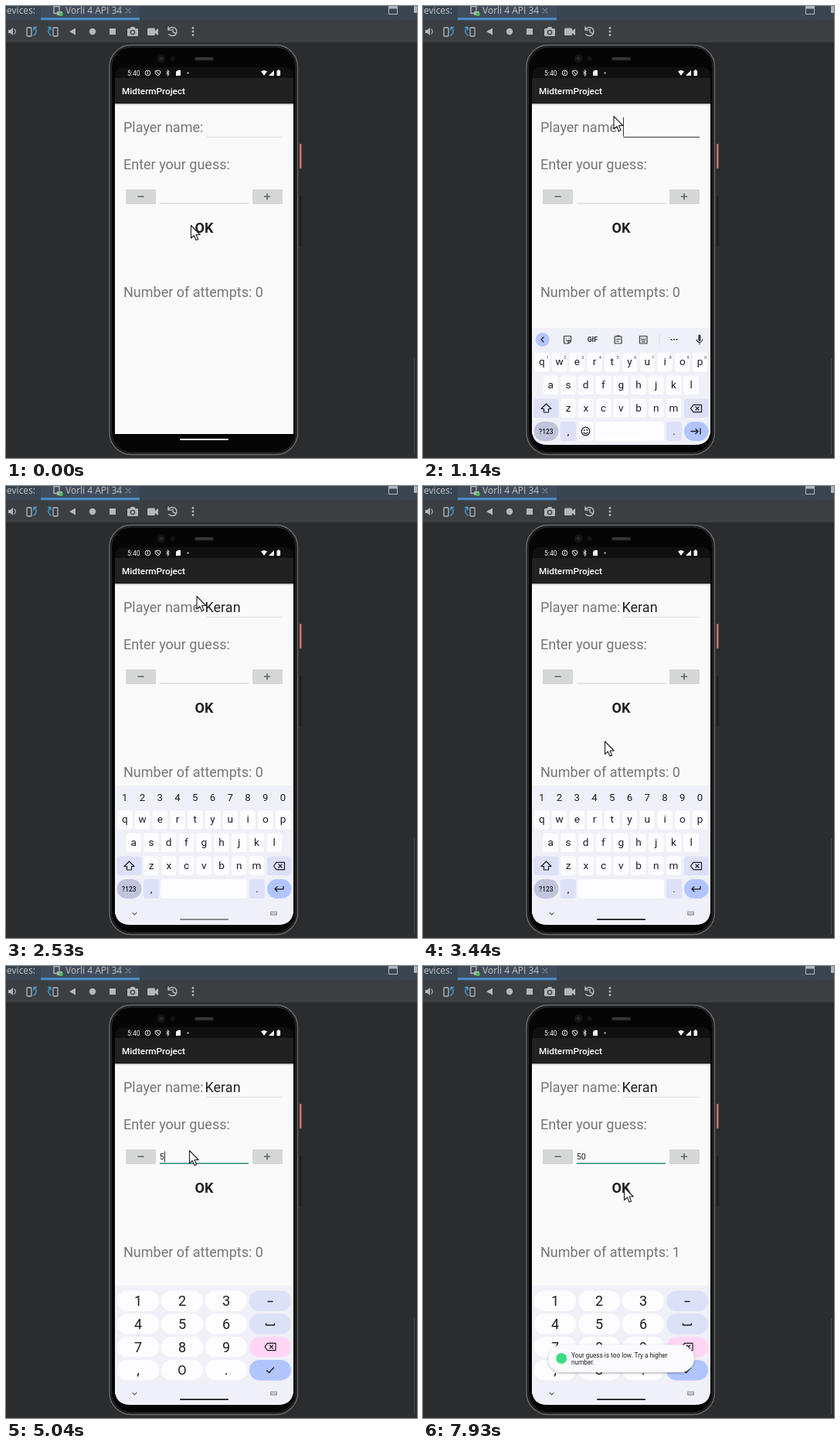
Write an HTML page that moves like this. It is 532 px wide and 584 px high and loops after 8 s.

```html
<!DOCTYPE html>
<html lang="en">
<head>
<meta charset="utf-8">
<title>Guessing game on a phone emulator</title>
<style>
  html, body { margin: 0; width: 100%; height: 100%; overflow: hidden; background: #2b2c2e; }
  svg { display: block; }
  text { font-family: Roboto, "Noto Sans", sans-serif; white-space: pre; }
  .ide { font-family: "Open Sans", "Noto Sans", sans-serif; }
  .ln { fill: none; stroke-linecap: round; stroke-linejoin: round; }
</style>
</head>
<body>
<svg id="stage" width="532" height="584" viewBox="0 0 532 584"></svg>
<script>
const LOOP = 8000;
const INK = '#1d1d22', KEY = '#fdfcff', SOFT = '#dde1f8', BLUE = '#b1c5ff', BOARD = '#f0f0f8';

// Markup helpers
const rect = (x, y, w, h, fill, r = 0, extra = '') =>
  `<rect x="${x}" y="${y}" width="${w}" height="${h}" rx="${r}" fill="${fill}" ${extra}/>`;
const text = (x, y, s, size, fill, extra = '') =>
  `<text x="${x}" y="${y}" font-size="${size}" fill="${fill}" ${extra}>${s}</text>`;
const mid = (x, y, s, size, fill = INK, extra = '') =>
  text(x, y, s, size, fill, 'text-anchor="middle" ' + extra);
const line = (d, color, w = 1.2) => `<path class="ln" d="${d}" stroke="${color}" stroke-width="${w}"/>`;
const fill = (d, color) => `<path d="${d}" fill="${color}"/>`;
const dot = (x, y, r, color, extra = '') => `<circle cx="${x}" cy="${y}" r="${r}" fill="${color}" ${extra}/>`;
const group = (id, body, extra = '') => `<g id="${id}" ${extra}>${body}</g>`;

function ide() {
  const c = '#b4b7ba', b = '#3f9fd0';
  return rect(0, 0, 532, 584, '#2b2c2e') +
    rect(0, 0, 532, 19, '#3a4552') + rect(45, 0, 128, 15, '#3f4c5b') +
    rect(45, 15, 128, 3.5, '#4a88c7') + rect(0, 18.5, 532, 28.5, '#3c3f41') +
    text(38, 10, 'Running Devices:', 12, '#c3c6c9', 'class="ide" text-anchor="end"') +
    text(77, 10, 'Vorli 4 API 34', 12, '#c3c6c9', 'class="ide"') +
    line('M62 0V9.5H66M69 6V0M62 .5H69', c, 1.4) + rect(66, 7, 7, 5, c, 1) + dot(71, 10.5, 2.6, '#49c153') +
    line('M155 3L161 9M161 3L155 9', '#7d848b', 1.1) +
    rect(495.5, 1, 11, 9.5, 'none', 0, `stroke="${c}"`) + rect(495, 0, 12, 3.5, c) +
    rect(528, 0, 4, 9, c, 1) +
    // toolbar
    fill('M3 31H5.500L9 28V38L5.500 35H3Z', c) + line('M11 30Q13.500 33 11 36', c) +
    rect(27, 28, 6, 11, 'none', 1, `stroke="${c}" stroke-width="1.3"`) +
    line('M36 38Q42 33 37 28M36 31V27.500H39.500', b, 1.5) +
    rect(61, 28, 6, 11, 'none', 1, `stroke="${c}" stroke-width="1.3"`) +
    line('M58 38Q52 33 57 28M54.500 27.500H58V31', b, 1.5) +
    fill('M82 33L90 28.500V37.500Z', c) + dot(112, 33, 4.2, c) + rect(134, 29, 8, 8, c) +
    rect(157, 29, 14, 10, c, 1.5) + rect(161, 27, 6, 4, c, 1) + dot(164, 34, 3.3, '#3c3f41') + dot(164, 34, 1.9, c) +
    rect(183, 28.5, 10, 9.5, c, 1.5) + fill('M193 32L197 29V38L193 35Z', c) +
    line('M211 29.500A5.600 5.600 0 1 1 211 36.500M210 27V31H214M216 30V33.500L219 35', c, 1.5) +
    [28.5, 33, 37.5].map(y => dot(242, y, 1.4, c)).join('') +
    rect(528, 455, 1, 129, '#4a4b4d') + rect(0, 579, 532, 5, '#2f2e2e');
}

function body() {
  const w = '#f4f4f4';
  return rect(380, 178, 2.5, 32, '#c9776c', 1) + rect(380, 245, 2.5, 66, '#1d1e1f', 1) +
    rect(134, 50.5, 243.5, 529, '#161617', 28, 'stroke="#6a6b6d" stroke-width="1.4"') +
    rect(136.5, 53, 238.5, 524, '#050505', 26, 'stroke="#2c2d2e" stroke-width="1"') +
    rect(244, 66, 25, 4.5, '#2c2c2e', 2) + rect(247, 67.6, 19, 1.2, '#444446') +
    dot(201, 68, 5.5, '#141416') + dot(201, 68, 2.4, '#26282c') + rect(213, 65, 5, 6, '#121214', 1) +
    fill('M141 94V91Q141 79 153 79H360Q372 79 372 91V94Z', '#101010') +
    rect(141, 93, 231, 33.5, '#212121') + rect(141, 126.5, 231, 426.5, '#fafafa') +
    rect(141, 126.5, 231, 1, '#d2d2d2') + rect(141, 127.5, 231, 1, '#ececec') +
    // status bar
    text(157, 89.7, '5:40', 8.6, w) +
    dot(183.5, 86.5, 3.3, 'none', `stroke="${w}"`) + rect(183, 85.7, 1, 2.6, w) + rect(183, 84.2, 1, 1, w) +
    line('M193.500 84L196.500 83L199.500 84V87Q199 89 196.500 90Q194 89 193.500 87ZM195 84.500L198 88.500', w, 1) +
    line('M209.500 83V90M207.500 85L211.500 88L209.500 90M207.500 88L211.500 85L209.500 83', w, .8) +
    fill('M220 85L222 83H226V90H220Z', w) + dot(235.5, 86.5, 1, w) +
    fill('M330 84.500Q334 81.500 338 84.500L334 90Z', w) + fill('M340 90L347 83V90Z', w) +
    rect(350.5, 83.2, 4.6, 7, w, .8) + rect(352, 82.3, 1.6, 1.5, w) +
    text(150, 114, 'MidtermProject', 11.75, '#fff', 'font-weight="500"');
}

function app() {
  const g = '#757575';
  const step = (x, d) => rect(x, 237, 39, 19, '#d6d7d7', 1) + line(d, '#626262', 1.6);
  return text(152, 163, 'Player name:', 18, g) + text(152, 211, 'Enter your guess:', 18, g) +
    text(152, 376, 'Number of attempts: <tspan id="tries">0</tspan>', 18, g) +
    mid(256.5, 293, 'OK', 18, '#212121', 'font-weight="700"') +
    step(155, 'M171 246.300H178') + step(319, 'M334.500 246.300H341.500M338 242.800V249.800') +
    '<rect id="nameLine" x="259" width="99"/><rect id="numLine" x="199" width="115"/>' +
    text(257.5, 163, '', 18, '#212121', 'id="name"') + text(198.7, 250, '', 10.6, '#212121', 'id="num"') +
    '<rect id="caret" width="1" fill="#333"/>';
}

const backspace = (x, y) =>
  line(`M${x - 7} ${y}L${x - 3.5} ${y - 4.7}H${x + 7}V${y + 4.7}H${x - 3.5}ZM${x - .5} ${y - 2}L${x + 3.5} ${y + 2}M${x + 3.5} ${y - 2}L${x - .5} ${y + 2}`, INK);

const footer = line('M164 551.500L166.500 554L169 551.500', '#66666c', 1.1) +
  rect(342, 549.5, 9, 5.5, '#a4a4ac', 1) + line('M343.500 551.300H349.500M344.500 553.200H348.500', BOARD, .8);

function letters() {
  let s = '';
  ['qwertyuiop', 'asdfghjkl', 'zxcvbnm'].forEach((row, r) => [...row].forEach((ch, i) => {
    const x = [153.8, 165.2, 188][r] + i * 22.75, y = 431 + r * 29.6;
    s += rect(x - 9.8, y - 12, 19.6, 24.5, KEY, 3.5) + mid(x, y + 4.3, ch, 13.6);
  }));
  return s + rect(143.5, 478.500, 32, 24.5, SOFT, 3.5) + rect(338, 478.500, 31.5, 24.5, SOFT, 3.5) +
    line('M159.500 485L166 491.500H162.500V496H156.500V491.500H153Z', INK) + backspace(353.5, 491) +
    rect(143.5, 508, 32, 25, '#c0c5dc', 12.5) + mid(159.3, 523.7, '?123', 8.4, INK, 'font-weight="500"') +
    rect(178, 508, 20, 25, SOFT, 3.5) + mid(188, 524.5, ',', 13) +
    rect(315, 508, 20, 25, SOFT, 3.5) + mid(325, 524.5, '.', 13) +
    rect(338, 508, 31.5, 25, BLUE, 12.5);
}

function toolbar() {
  const k = '#3c3d42';
  return dot(154.7, 402, 9, BLUE) + '<path id="chev" class="ln" stroke="#1d1d22" stroke-width="1.3"/>' +
    line('M357.900 397V402.500', k, 3.2) + line('M354.200 402Q355 405.500 358 405.500Q361 405.500 361.600 402M358 406V408', k) +
    group('tools',
      line('M182.500 397.500H191.500V404L188.500 407H182.500ZM191.500 403.500H188V407M185 402.500Q187 405 189 402.500M185 400H185.200M189 400H189.200', k) +
      mid(219.3, 405, 'GIF', 8.6, k, 'font-weight="900"') +
      line('M248.200 398H257V407H248.200ZM250.800 397H254.300M250.300 401.500H255M250.300 404H253.500', k) +
      line('M280.500 397.500H290V407H280.500ZM282.500 400H283M285 400H285.500M287.500 400H288M282.500 402.300H288M283.500 404.800H287', k) +
      rect(305.5, 395, 1, 14, '#dcdce4') + [321.5, 325, 328.5].map(x => dot(x, 402, 1.1, k)).join('')) +
    group('hints', [201, 260, 319].map((x, i) => mid(x, 405.5, '', 10.2, '#33343a', `id="hint${i}"`)).join(''));
}

function textBoard() {
  const col = i => 153.8 + i * 22.75;
  const digits = [...'1234567890'];
  return rect(141, 387, 231, 260, BOARD) + letters() + footer +
    group('wordKeys', toolbar() + digits.map((d, i) => mid(col(i) + 7.3, 427, d, 5.6, '#44454c')).join('') +
      rect(200.500, 508, 20, 25, KEY, 3.5) + rect(223, 508, 89, 25, KEY, 3.5) +
      dot(210.500, 520.5, 5.3, 'none', `stroke="${INK}" stroke-width="1.2"`) +
      line('M208 522Q210.500 525 213 522', INK) + dot(208.7, 519, .9, INK) + dot(212.3, 519, .9, INK) +
      line('M347 520.5H356M353 517.5L356 520.5L353 523.500M359 517V524', INK, 1.3)) +
    group('lineKeys', digits.map((d, i) => mid(col(i), 406.5, d, 13.2)).join('') +
      rect(200.500, 508, 111.5, 25, KEY, 3.5) +
      line('M359 517.5V520.8H348M351 517.8L348 520.8L351 523.800', INK, 1.3));
}

function numBoard() {
  let s = rect(141, 413, 231, 160, BOARD) + footer;
  const rows = ['123', '456', '789', ',O.'], tint = [SOFT, SOFT, '#ffd6f6', BLUE];
  rows.forEach((row, r) => {
    const y = 432.5 + r * 29.8;
    [...row].forEach((ch, i) => {
      s += rect(144 + 57 * i, y - 13, 54, 26.5, KEY, 13) + mid(171 + 57 * i, y + 6.4, ch, ch === 'O' ? 16.5 : 18);
    });
    s += rect(315, y - 13, 54, 26.5, tint[r], 13);
  });
  return s + line('M339 433.500H345', INK, 1.4) + line('M336.500 462V464H347.500V462', INK, 1.3) +
    backspace(342, 492) + line('M337.500 522.500L340.500 525.500L346.500 519', INK, 1.3);
}

const toast = rect(162, 489.5, 189, 35.5, '#fbfbff', 17.7, 'filter="url(#soft)"') +
  dot(179.2, 507, 7, '#3ddc84') +
  text(192, 505.5, 'Your guess is too low. Try a higher', 8.24, '#1f1f23') +
  text(192, 515, 'number.', 8.24, '#1f1f23');

const arrow = '<path id="cursor" d="M.5 .5V17L4.300 13.500L7 19.500L9.600 18.400L7 12.500H12.200Z" ' +
  'fill="#fff" stroke="#1c1c24" stroke-width="1.1" stroke-linejoin="round"/>';

document.getElementById('stage').innerHTML =
  '<defs><clipPath id="screen"><path d="M141 79H372V547Q372 567 352 567H161Q141 567 141 547Z"/></clipPath>' +
  '<filter id="soft" x="-10%" y="-30%" width="120%" height="170%">' +
  '<feDropShadow dx="0" dy="1" stdDeviation="1.4" flood-color="#000" flood-opacity=".35"/></filter></defs>' +
  ide() + body() +
  group('view', app() + group('words', textBoard()) + group('nums', numBoard()) +
    '<rect id="pill" x="225" y="559" width="63" height="2" rx="1"/>' + group('toast', toast),
    'clip-path="url(#screen)"') + arrow;

// Each row: start time, then the values that hold until the next row
const CURSOR = [[0, 239, 283], [120, 235, 243], [240, 251, 198], [390, 253, 186], [510, 257, 169],
  [630, 260, 154], [750, 259, 147], [870, 255, 144], [1020, 248, 142], [1140, 246.5, 142],
  [3200, 245, 196], [3320, 237, 300], [3440, 235, 329.5], [3590, 235, 239], [3740, 236, 238], [3860, 237, 238],
  [5560, 241, 247], [5680, 250, 264], [5800, 258, 278], [5920, 260, 286], [6040, 258, 289], [6160, 256, 290.5],
  [7930, 260, 285.5]];
const BOARD_Y = [[0, 200], [1020, 110], [1140, 29], [1290, 0]];
const PILL = [[0, '#fff'], [1440, '#e2e2e6'], [1590, '#cdcdd1'], [1710, '#bcbcc0'], [2530, '#8a8a8e'], [2650, '#5c5c60'], [2920, '#303034']];
const TYPED = [[0, ''], [1850, 'K', 'Keep', 'K', 'Know'], [1970, 'Ke', 'Key', 'Keep', 'Kept'],
  [2110, 'Kera', 'Ker', 'Kera', 'Kerb'], [2260, 'Keran', 'Keran', 'Kern', 'Kerning']];
const NAME_CARET = [[0, 0], [870, 1], [1590, 0], [1710, 1], [2530, 0]];
const GUESS = [[0, ''], [5040, '5'], [5190, '50']];
const NUM_CARET = [[0, 0], [3740, 1], [4540, 0], [5040, 1], [5680, 0], [6160, 1], [6590, 0], [7090, 1], [7650, 0]];
const TOAST = [[0, 0, .9, 2], [6590, .14, .937, 2.3], [6710, .55, .97, 1], [6830, .9, .99, .3], [6950, 1, 1, 0]];

const at = (rows, t) => rows.findLast(r => r[0] <= t).slice(1);
const el = id => document.getElementById(id);
const set = (id, attrs) => { for (const k in attrs) el(id).setAttribute(k, attrs[k]); };
const show = (id, on) => set(id, { display: on ? 'inline' : 'none' });
const write = (id, s) => { if (el(id).textContent !== s) el(id).textContent = s; };

function draw(t) {
  const [x, y] = at(CURSOR, t);
  set('cursor', { transform: `translate(${x} ${y})` });

  const inName = t >= 870 && t < 2530, inNum = t >= 3740;
  set('nameLine', inName ? { y: 168.9, height: 1.1, fill: '#4a4a4a' } : { y: 169, height: 1, fill: '#e2e2e2' });
  set('numLine', inNum ? { y: 254.3, height: 1.6, fill: '#3b8f86' } : { y: 254.5, height: 1, fill: '#cfcfcf' });

  const [name, ...hints] = at(TYPED, t), [guess] = at(GUESS, t);
  write('name', name);
  write('num', guess);
  write('tries', t < 6590 ? '0' : '1');

  show('caret', at(NAME_CARET, t)[0] || at(NUM_CARET, t)[0]);
  if (inNum) set('caret', { x: 199 + guess.length * 6, y: 239.5, height: 14 });
  else set('caret', { x: 259 + (name ? el('name').getComputedTextLength() - 1 : 0), y: 144, height: 24 });

  show('words', t >= 1020 && t < 4010);
  set('words', { transform: `translate(0 ${at(BOARD_Y, t)[0]})` });
  show('nums', t >= 4010);
  show('wordKeys', t < 2530);
  show('lineKeys', t >= 2530);
  show('tools', !name);
  show('hints', name);
  hints.forEach((h, i) => write('hint' + i, h));
  set('chev', { d: name ? 'M153.500 399L156.500 402L153.500 405' : 'M156 399L153 402L156 405' });
  set('pill', { fill: at(PILL, t)[0] });

  const [alpha, k, dy] = at(TOAST, t);
  show('toast', alpha);
  set('toast', { opacity: alpha, transform: `translate(256.5 ${507.3 + dy}) scale(${k}) translate(-256.5 -507.3)` });
}

const start = performance.now();
function tick() {
  draw((performance.now() - start) % LOOP);
  requestAnimationFrame(tick);
}
tick();
</script>
</body>
</html>
```
